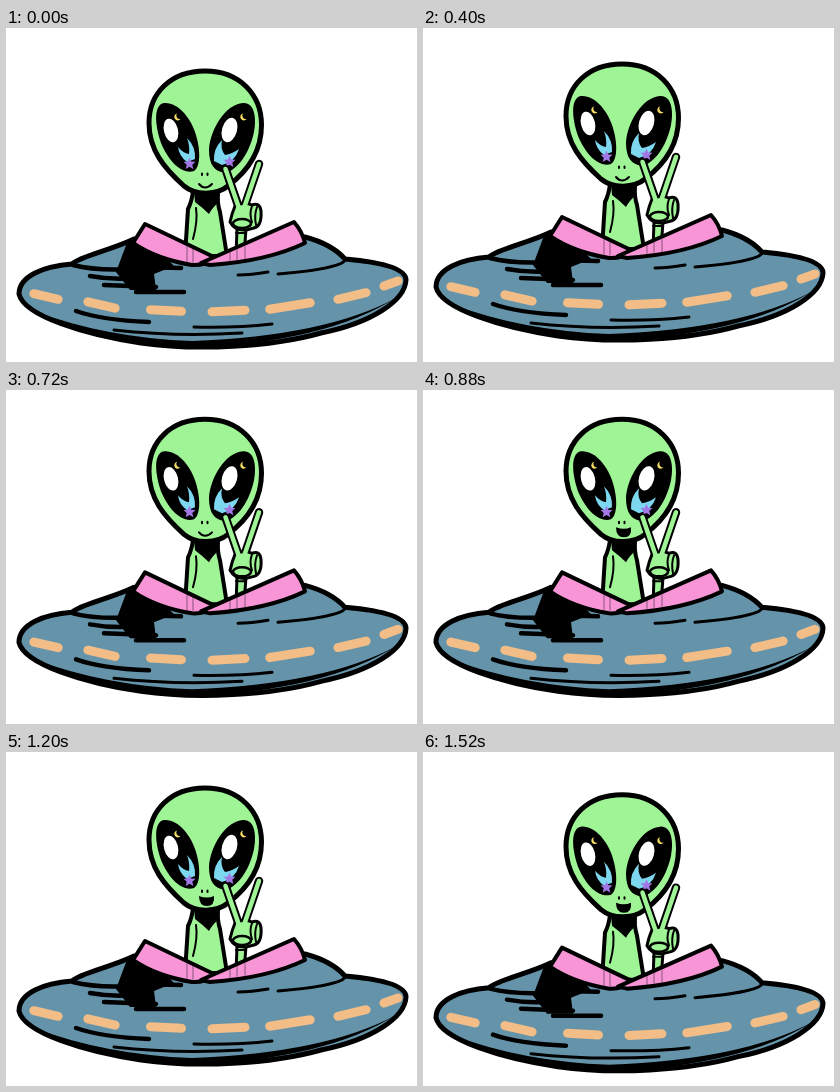
Recreate the animation shown at these times as an HTML page. Size 411 px wide and 334 px high, loop 1600 ms.

```html
<!DOCTYPE html>
<html lang="en">
<head>
<meta charset="utf-8">
<title>Alien in a saucer</title>
<style>
  html, body { margin: 0; width: 100%; height: 100%; overflow: hidden; background: #fff; }
  svg { display: block; width: 411px; height: 334px; }
  .line { fill: none; stroke: #000; stroke-width: 2; }
  .brush { fill: none; stroke: #000; stroke-width: 4.5; }
  .thin { stroke-width: 3; }
  .skin { fill: #9ff596; stroke: #000; }
  .hull { fill: #6594aa; stroke: #000; }
  .pink { fill: #f795d6; stroke: #000; stroke-width: 4; }
  .sky { fill: #7dd8ef; }
  .star { fill: #a277e6; }
  .moon { fill: #f6dc62; }
  .finger { fill: none; stroke: #000; stroke-width: 8.5; }
  .finger.in { stroke: #9ff596; stroke-width: 4.5; }
</style>
</head>
<body>
<svg viewBox="0 0 411 334" stroke-linecap="round" stroke-linejoin="round">
  <defs>
    <path id="star" d="M0-6L1.7-2 6-1.8 2.8 1.2 3.8 5.5 0 3.2-3.8 5.5-2.8 1.2-6-1.8-1.7-2Z"/>
    <path id="moon" d="M-1-3.500A3.500 3.500 0 1 0 2.600 2A3.500 3.500 0 0 1-1-3.500Z"/>
  </defs>
  <g id="ship">
    <!-- saucer -->
    <path class="hull" stroke-width="5" d="M13 266C13 248 38 238 66 236C74 228 106 222 128 211L206 234L299 209C318 214 331 222 339 231C374 234 400 240 400 252C399 273 365 295 315 305C265 319 190 323 135 315C80 307 18 288 13 266Z"/>
    <path d="M28 283Q100 310 186 313Q320 308 390 270Q320 314 186 320Q95 316 28 283Z"/>
    <path class="brush thin" d="M339 232C337 238 308 243 272 246M262 244Q245 247 232 247"/>
    <path d="M122 212H134Q158 226 168 238L148 246 150 262H124L110 244Z"/>
    <path class="brush" d="M67 237Q90 243 125 241M84 248Q105 252 130 250M130 239L175 240M98 257L150 259M130 264L178 264M70 283Q95 292 143 294"/>
    <path class="brush thin" d="M188 299Q230 300 266 296M108 302Q170 309 236 305"/>
    <g id="lights" fill="#f3bd87"></g>

    <!-- body -->
    <path class="skin" stroke-width="4" d="M187 163Q186 173 182 181L179 228H221L214 184Q211 175 212 163Z"/>
    <path d="M188 163H214L213 174Q206 180 203 186Q197 180 189 174Z"/>
    <path class="line" d="M190 180Q192 193 187 211"/>

    <!-- head -->
    <path class="skin" stroke-width="5" d="M199 43C234 43 255.500 67 255.500 97C255.500 126 238 146 222 158C211 167 190 168 178 158C158 140 143 122 143 95C143 65 165 43 199 43Z"/>
    <path d="M158 75C172 74 185 90 190 107C195 124 194 139 188 143C175 147 162 132 155 115C149 98 147 77 158 75Z"/>
    <path d="M237 75C248 74 251 89 248 104C244 123 234 139 222 144C210 146 203 138 203 122C204 101 220 76 237 75Z"/>
    <g fill="#fff">
      <ellipse cx="165" cy="102.500" rx="7" ry="12" transform="rotate(-14 165 102.500)"/>
      <ellipse cx="223.500" cy="102" rx="7.500" ry="12.500" transform="rotate(16 223.500 102)"/>
    </g>
    <path class="sky" d="M181 110Q190 119 189 131L181 134Q173 128 172 119Q177 125 183 126Q184 118 181 110Z"/>
    <path class="sky" d="M216 112Q207 121 208 133L216 137Q229 134 233 121Q226 126 219 127Q214 121 216 112Z"/>
    <use href="#moon" class="moon" x="172" y="89"/>
    <use href="#moon" class="moon" x="238" y="89"/>
    <use href="#star" class="star" x="183.500" y="135.500"/>
    <use href="#star" class="star" x="223.500" y="133.500"/>
    <path class="line" d="M196 145.500V147M201.500 145.500V147"/>
    <path id="smile" class="line" d="M193 156Q199 163 206 156"/>
    <path id="grin" d="M193 151Q201 154 208 151Q209 161 201 161Q193 161 193 151Z"/>

    <!-- hand -->
    <path class="skin" stroke-width="3" d="M231 201H240L238 228H230Z"/>
    <path class="finger" d="M219.500 141L233 180M253 136L238 180"/>
    <path class="skin" stroke-width="3" d="M229 178Q238 173 246 177Q254 174 255 183Q256 198 248 200L240 202Q229 203 224 194Q226 185 229 178Z"/>
    <path class="finger in" d="M219.500 141L233 180M253 136L238 180"/>
    <path class="line" d="M246 178Q243 186 246 194M251 179Q248 187 250 197M230 205H240"/>
    <ellipse class="skin" stroke-width="2.500" cx="236" cy="195.500" rx="9" ry="4.500"/>

    <!-- canopy -->
    <path class="pink" d="M139 196L210 230Q198 238 186 237Q150 231 127 215Z"/>
    <path class="pink" d="M288 194Q296 203 299 215Q262 233 204 237L195 235Z"/>
    <path class="line" stroke-opacity=".22" d="M181 219V233M187 221V234M224 225V232M231 222V231M239 219V230"/>
  </g>
</svg>
<script>
const LOOP = 1600, STEP = 80, RISE = 7;
const byId = id => document.getElementById(id);

// x, y, length, tilt
const lights = [
  [40, 268.5, 34, 13], [95.5, 277, 37, 13], [160, 282.5, 40, 3], [222.5, 283, 42, -3],
  [284, 278, 50, -9], [346, 268, 38, -13], [385, 255.5, 24, -20]
];
byId("lights").innerHTML = lights.map(([x, y, w, tilt]) =>
  `<rect x="${-w / 2}" y="-4.5" width="${w}" height="9" rx="4.5" transform="translate(${x} ${y}) rotate(${tilt})"/>`
).join("");

function draw(now) {
  const tick = Math.floor(now % LOOP / STEP);
  const lift = RISE * (1 - Math.cos(2 * Math.PI * tick * STEP / LOOP));
  const talking = tick % 4 > 1;
  byId("ship").setAttribute("transform", `translate(0 ${-lift.toFixed(2)})`);
  byId("smile").style.display = talking ? "none" : "";
  byId("grin").style.display = talking ? "" : "none";
}

const start = performance.now();
function loop() {
  draw(performance.now() - start);
  requestAnimationFrame(loop);
}
loop();
</script>
</body>
</html>
```
